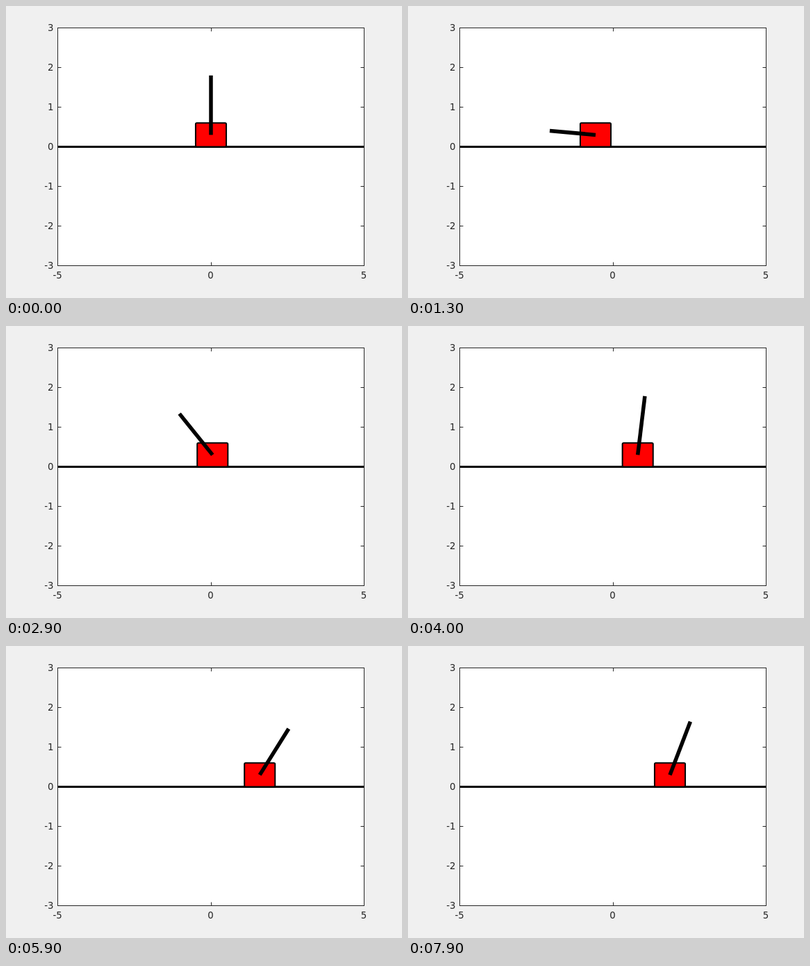
Animation of 570x420 px, one loop 8000 ms. Source, as an HTML page:

```html
<!DOCTYPE html>
<html>
<head>
<meta charset="utf-8">
<style>
html, body { margin: 0; width: 570px; height: 420px; overflow: hidden; background: #f0f0f0; }
svg { display: block; }
text { font: 13.33px "DejaVu Sans", sans-serif; fill: #262626; }
</style>
</head>
<body>
<svg width="570" height="420">
  <rect x="74.5" y="31.5" width="441" height="342" fill="#fff" stroke="#262626"/>
  <path id="ticks" stroke="#262626"/>
  <g id="labels"></g>
  <path d="M74.5 202.5H515.5" stroke="#000" stroke-width="3"/>
  <g id="cart">
    <rect x="-22.05" y="168.3" width="44.1" height="34.2" rx="1.7" fill="#f00" stroke="#000" stroke-width="2"/>
    <path id="pole" stroke="#000" stroke-width="5.5"/>
  </g>
</svg>
<script>
const $ = id => document.getElementById(id);
const X0 = 295, Y0 = 202.5, SX = 44.1, SY = 57;
const LOOP = 8000, STEP = 100, POLE = 1.5, PIVOT = Y0 - 0.3 * SY;

let ticks = '', labels = '';
const label = (x, y, anchor, value) =>
  labels += `<text x="${x}" y="${y}" text-anchor="${anchor}">${value}</text>`;
for (let v = -3; v <= 3; v++) {
  const y = Y0 - v * SY;
  ticks += `M74.5 ${y}h5M515.5 ${y}h-5`;
  label(68.5, y + 4.7, 'end', v);
}
for (let v = -5; v <= 5; v += 5) {
  const x = X0 + v * SX, crisp = Math.floor(x) + 0.5;
  ticks += `M${crisp} 31.5v5M${crisp} 373.5v-5`;
  label(x - 0.4, 392, 'middle', v);
}
$('ticks').setAttribute('d', ticks);
$('labels').innerHTML = labels;

// Key poses: time (s), cart centre (px), pole angle from vertical (degrees)
const keys = [
  [0, 295, 0], [0.9, 275.8, -64], [1.3, 270, -86], [1.8, 270.3, -82],
  [2.9, 297.3, -46.1], [4, 330.7, 8.9], [5.1, 354.7, 35.3],
  [6.7, 371.7, 35.3], [7.9, 377, 26.4]
];

// Slope at key i: blend of the neighbouring slopes
function slope(i, c) {
  const rise = k => (keys[k + 1][c] - keys[k][c]) / (keys[k + 1][0] - keys[k][0]);
  if (i === 0) return rise(0);
  if (i === keys.length - 1) return rise(i - 1);
  const before = keys[i][0] - keys[i - 1][0], after = keys[i + 1][0] - keys[i][0];
  return (rise(i - 1) * after + rise(i) * before) / (before + after);
}

// Smooth cubic through column c of the key poses
function curve(t, c) {
  let i = 0;
  while (i < keys.length - 2 && t >= keys[i + 1][0]) i++;
  const a = keys[i], b = keys[i + 1], h = b[0] - a[0], u = (t - a[0]) / h, w = 1 - u;
  return w * w * ((1 + 2 * u) * a[c] + u * h * slope(i, c)) +
    u * u * ((3 - 2 * u) * b[c] - w * h * slope(i + 1, c));
}

const start = performance.now();
function draw() {
  const ms = (performance.now() - start) % LOOP;
  const t = Math.floor(ms / STEP) * STEP / 1000;
  const angle = curve(t, 2) * Math.PI / 180;
  $('cart').setAttribute('transform', `translate(${curve(t, 1)})`);
  $('pole').setAttribute('d',
    `M0 ${PIVOT}l${POLE * SX * Math.sin(angle)} ${-POLE * SY * Math.cos(angle)}`);
  requestAnimationFrame(draw);
}
draw();
</script>
</body>
</html>
```
